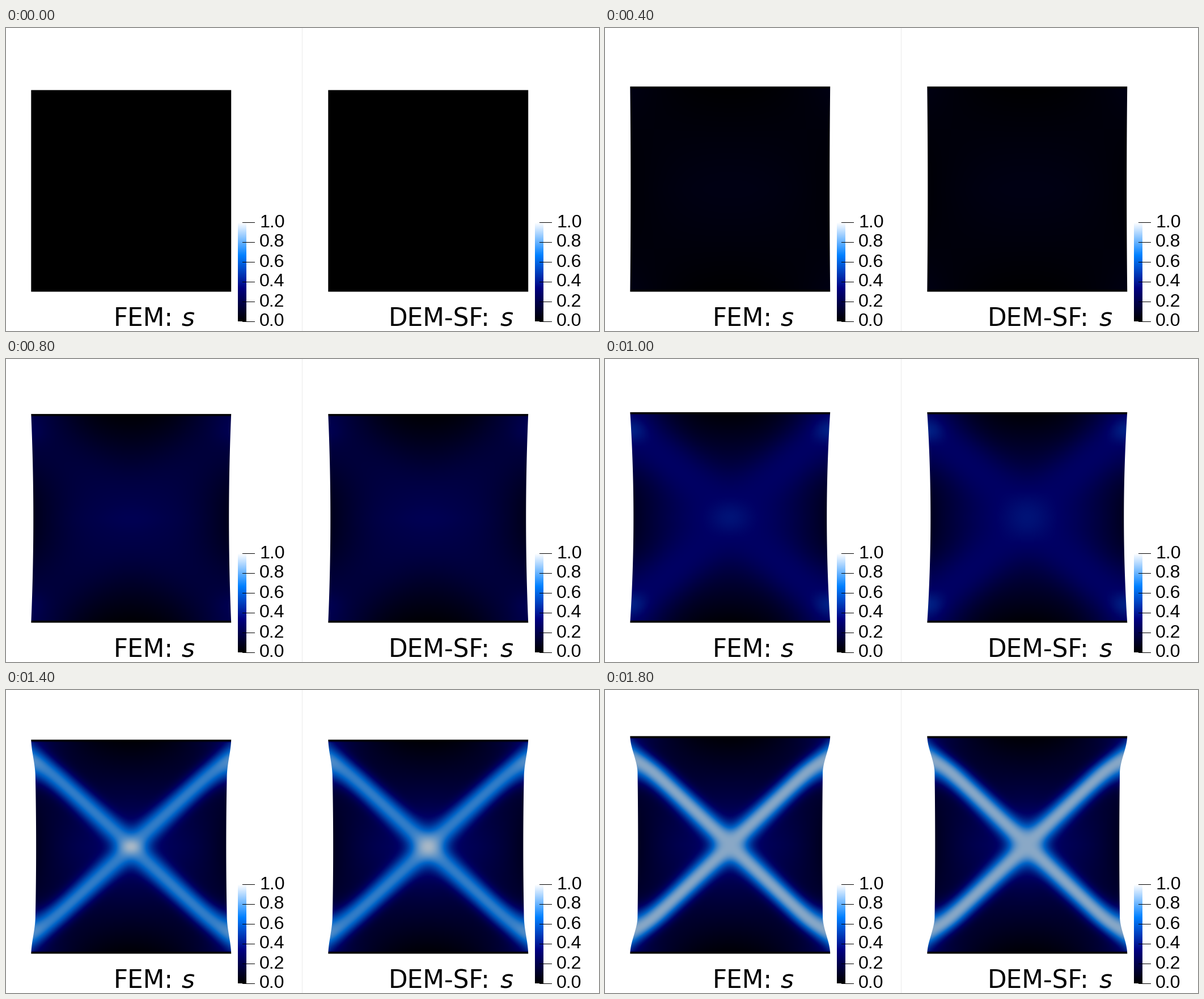
Animation, 1046 px wide and 535 px high, one loop 2 s. Source, as a matplotlib script:

```python
import numpy as np
import matplotlib.pyplot as plt
from matplotlib.animation import FuncAnimation
from matplotlib.patches import Rectangle

W, H, DPI = 1046, 535, 100
FRAMES, INTERVAL = 10, 200
PANEL_SHIFT = 524
LEFT, RIGHT, BOTTOM = 44.3, 397.2, 465.6
CX, HALF_W = (LEFT + RIGHT) / 2, (RIGHT - LEFT) / 2
ARM_SPAN = 165
X0, X1, Y0, Y1 = 40, 402, 76, 470

STOPS = [0, 1 / 3, 2 / 3, 1]
BAR_COLORS = np.array([[0, 0, 0], [0, 0, 128], [0, 128, 255], [255, 255, 255]]) / 255
LIT_COLORS = np.array([[0, 0, 0], [0, 0, 100], [0, 100, 200], [197, 198, 198]]) / 255

# The two solvers differ in the size of the central spot and its glow.
FEM = dict(core=(20, 15), halo=0.10)
DEM = dict(core=(23, 21), halo=0.20)


def colorize(s, colors):
    return np.stack([np.interp(s, STOPS, c) for c in colors.T], axis=-1)


def smoothstep(t):
    t = np.clip(t, 0, 1)
    return t * t * (3 - 2 * t)


def bump(x, y, width, height):
    return np.exp(-(x / width) ** 2 - (y / height) ** 2)


def crack_growth(step):
    return 1 / (1 + np.exp(-1.9 * (step - 6.4)))


def damage(model, step, X, Y, half_h):
    """Damage on specimen coordinates X, Y in [-1, 1]."""
    u, v = np.clip(np.abs(X), 0, 1), np.clip(np.abs(Y), 0, 1)
    dx, dy = u * ARM_SPAN, v * half_h
    grow = crack_growth(step)
    spread = (1 - grow) ** 6

    # Diffuse damage: strongest along the diagonals.
    diffuse = min(0.0165 * step ** 2, 0.32)
    s = diffuse * (1 - 0.95 * v ** 1.3 * (1 - u ** 2) - 0.68 * u ** 2.2 * (1 - v ** 2))

    # Two crossing bands that level off and widen near the free sides.
    arm = np.hypot(0.95 * dx, 6) - 8 * u ** 8
    width = (20.5 + 35 * spread) * (1 + 0.15 * u ** 10)
    near, far = (np.exp(-(np.abs(dy + sign * arm) * 0.725 / width) ** 2.2)
                 for sign in (-1, 1))
    band = 1 - (1 - near) * (1 - far)
    peak = 0.9 * diffuse + 0.61 * grow
    s += smoothstep((step - 3) / 2) * np.maximum(peak - s, 0) * band

    # Glow around the crossing, and hot spots that flare as the crack forms.
    s += model["halo"] * grow * bump(dx, dy, 32, 50) * (1 - band)
    core_w, core_h = np.array(model["core"]) * (1 + 1.2 * spread)
    s += 1.1 * grow * (1 - grow) * bump(dx, dy, core_w, core_h)
    flare = 0.13 * np.exp(-((step - 5.6) / 1.5) ** 2)
    s += flare * bump(ARM_SPAN - dx, dy - 0.83 * half_h, 26, 21)
    return np.clip(s, 0, 0.95)


def specimen(model, step):
    x, y = np.meshgrid(np.arange(X0, X1) + 0.5, np.arange(Y0, Y1) + 0.5)
    top = 109.6 - 3.13 * step
    half_h = (BOTTOM - top) / 2
    Y = (y - (BOTTOM + top) / 2) / half_h

    # The sides neck in smoothly, then form notches where the bands exit.
    end = np.clip((1 - np.abs(Y)) / 2, 0, 0.5)
    bulk = 0.25 * min(step, 5) ** 2 * (1 - 0.7 * crack_growth(step))
    notch = 3.1 * max(step - 5.1, 0)
    half_w = HALF_W - bulk * 4 * end * (1 - end) - notch * smoothstep(end / 0.17)

    from_side = half_w - np.abs(x - CX)
    from_end = half_h * (1 - np.abs(Y))
    s = damage(model, step, (x - CX) / half_w, Y, half_h)
    s *= np.clip((from_end - 2) / 3, 0, 1)
    alpha = np.clip(from_side + 0.5, 0, 1) * np.clip(from_end + 0.5, 0, 1)
    return np.dstack([colorize(s, LIT_COLORS), alpha])


fig = plt.figure(figsize=(W / DPI, H / DPI), dpi=DPI, facecolor="white")
ax = fig.add_axes([0, 0, 1, 1])
ax.axis("off")


def picture(data, left, right, top, bottom):
    return ax.imshow(data, extent=(left, right, bottom, top), aspect="auto",
                     interpolation="nearest", zorder=2)


def write(x, baseline, text, size, font, style="normal"):
    ax.text(x, baseline, text, fontsize=size * 72 / DPI, family=font, style=style,
            color="black", va="baseline", ha="left", zorder=4)


def color_bar(shift):
    ramp = colorize(np.linspace(1, 0, 175), BAR_COLORS)[:, None, :]
    picture(ramp, 409 + shift, 424 + shift, 343, 518)
    for i in range(6):
        y = int(343 + 35.1 * i)
        ax.add_patch(Rectangle((417 + shift, y), 22, 1, color="black", lw=0,
                               antialiased=False, zorder=3))
        write(447 + shift, y + 8.5, f"{1 - i / 5:.1f}", 32.2, "Liberation Sans")


def title(x, name, symbol_x):
    write(x, 526.5, name, 43.8, "DejaVu Sans")
    write(symbol_x, 526.5, "s", 44.4, "DejaVu Sans", "italic")


panels = []
for model, shift in ((FEM, 0), (DEM, PANEL_SHIFT)):
    image = picture(specimen(model, 0), X0 + shift, X1 + shift, Y0, Y1)
    panels.append((model, image))
    color_bar(shift)
title(189.6, "FEM:", 309.3)
title(674.9, "DEM-SF:", 872)
ax.add_patch(Rectangle((522, 0), 1, H, color="#ebebeb", lw=0, antialiased=False))
ax.set_xlim(0, W)
ax.set_ylim(H, 0)


def update(step):
    for model, image in panels:
        image.set_data(specimen(model, step))
    return [image for _, image in panels]


anim = FuncAnimation(fig, update, frames=FRAMES, interval=INTERVAL,
                     repeat=True, repeat_delay=0, blit=False)
plt.show()
```
